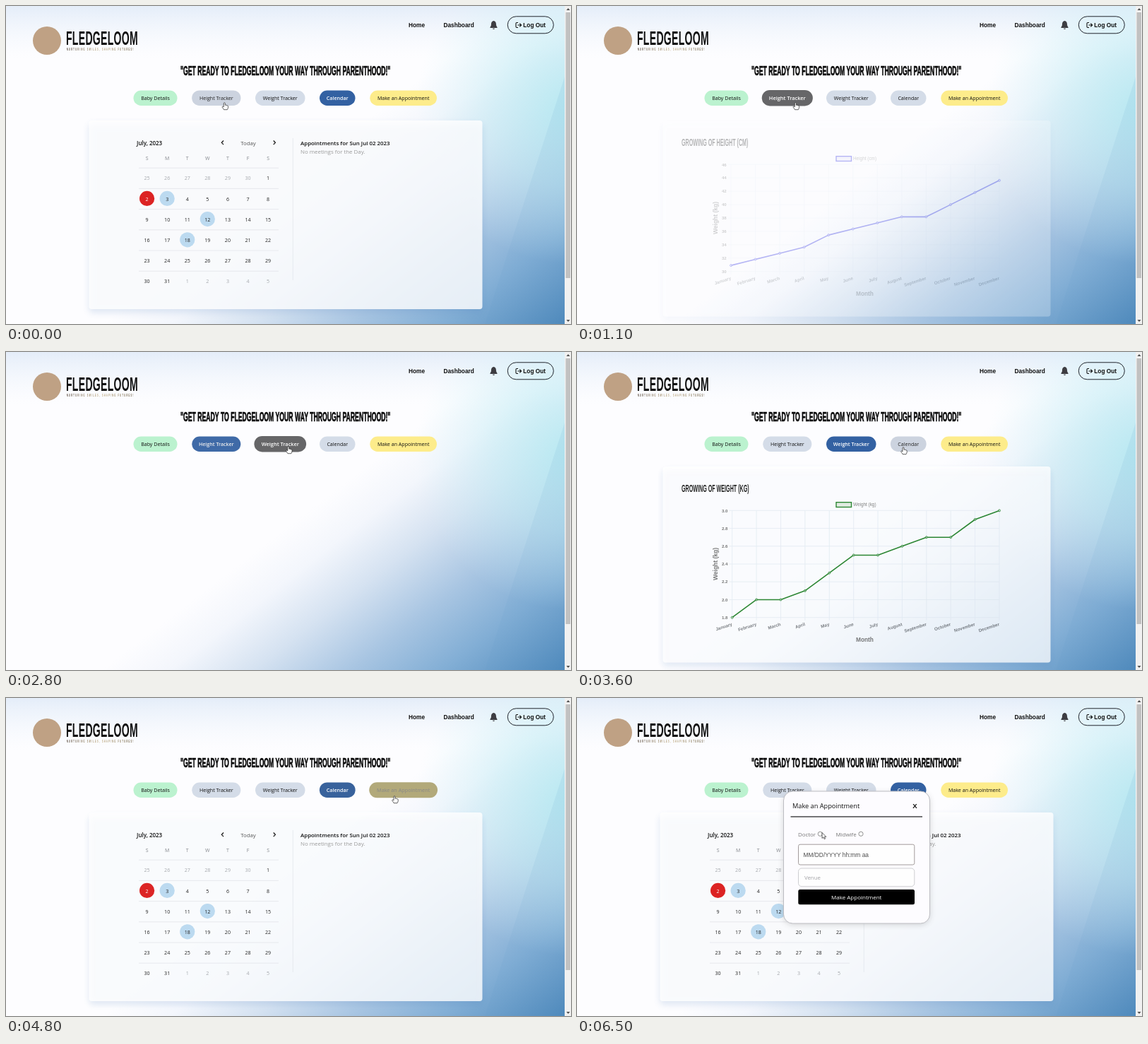
An HTML page for the animation above (6900 ms loop, 800 by 450 pixels).

```html
<!DOCTYPE html>
<html lang="en">
<head>
<meta charset="utf-8">
<title>Parenthood dashboard</title>
<style>
  html, body { margin: 0; width: 100%; height: 100%; overflow: hidden; background: #fff; }
  svg { display: block; width: 800px; height: 450px; }
  text { font-family: "Open Sans", "Noto Sans", sans-serif; }
  .arial, .display { font-family: "Liberation Sans", Arial, sans-serif; }
  .display, .bold { font-weight: 700; }
  .heavy { stroke: #0a0a0a; stroke-width: .7px; }
  .mid { text-anchor: middle; }
  .end { text-anchor: end; }
</style>
</head>
<body>
<svg id="stage" viewBox="0 0 800 450" xmlns="http://www.w3.org/2000/svg">
  <defs>
    <linearGradient id="sky" gradientUnits="userSpaceOnUse" x1="404" y1="243" x2="647" y2="559">
      <stop offset="0" stop-color="#fdfdff"/>
      <stop offset=".15" stop-color="#f3f6fc"/>
      <stop offset=".33" stop-color="#d5e2f1"/>
      <stop offset=".54" stop-color="#a8c5e2"/>
      <stop offset=".74" stop-color="#82aed5"/>
      <stop offset="1" stop-color="#508abc"/>
    </linearGradient>
    <radialGradient id="cyan" gradientUnits="userSpaceOnUse" cx="800" cy="145" r="220">
      <stop offset="0" stop-color="#b4edf3" stop-opacity=".8"/>
      <stop offset=".5" stop-color="#c6f0f6" stop-opacity=".5"/>
      <stop offset="1" stop-color="#d8f4fa" stop-opacity="0"/>
    </radialGradient>
    <linearGradient id="top" x1="0" y1="0" x2="0" y2="1">
      <stop offset="0" stop-color="#e4edf9"/>
      <stop offset="1" stop-color="#f4f8fd" stop-opacity="0"/>
    </linearGradient>
    <linearGradient id="beam" x1="0" y1="0" x2="0" y2="1">
      <stop offset="0" stop-color="#3f86bd" stop-opacity=".09"/>
      <stop offset="1" stop-color="#3f86bd" stop-opacity=".04"/>
    </linearGradient>
    <linearGradient id="gold">
      <stop offset="0" stop-color="#4a3a2c"/>
      <stop offset=".5" stop-color="#c0a878"/>
      <stop offset="1" stop-color="#5c4c2e"/>
    </linearGradient>
    <filter id="soft" x="-10%" y="-10%" width="120%" height="125%">
      <feGaussianBlur stdDeviation="5"/>
    </filter>
  </defs>
  <rect width="800" height="450" fill="url(#sky)"/>
  <rect width="800" height="75" fill="url(#top)"/>
  <rect width="800" height="450" fill="url(#cyan)"/>
  <path d="M791 100V450H678Z" fill="url(#beam)"/>
  <g id="header"></g>
  <g id="buttons"></g>
  <g id="calendar"></g>
  <g id="height"></g>
  <g id="weight"></g>
  <g id="modal"></g>
  <g id="bar">
    <path d="M791 0H800V450H791Z" fill="#f1f1f1"/>
    <path d="M792.5 9H799V385H792.5Z" fill="#c1c1c1"/>
    <path d="M793.5 6L796 3L798.5 6ZM793.5 444L796 447L798.5 444Z" fill="#505050"/>
  </g>
  <g id="cursor" stroke="#222" stroke-width=".7" stroke-linejoin="round" fill="#fff">
    <path id="hand" d="M-1 5.8V.9Q0-.5 1 .9V3.8Q2.1 3 2.6 4.1Q3.7 3.5 4.1 4.6Q5.3 4.3 5.3 5.8Q5.3 8.6 4 10.2H-.9Q-1.5 8.7-3 7Q-3.7 5.8-2.5 5.5Q-1.7 5.5-1 6.5Z"/>
    <path id="arrow" d="M0 0V8L1.9 6.4L3.2 9.2L4.6 8.6L3.3 5.9H5.8Z"/>
  </g>
</svg>
<script>
const $ = id => document.getElementById(id);
const LOOP = 6900, STEP = 100, LAST = 6500;

// Click times that switch the visible panel
const CLICK = { height: 650, weight: 2750, calendar: 3850, modal: 5700 };

const clamp = v => Math.min(1, Math.max(0, v));
const smooth = v => { v = clamp(v); return v * v * (3 - 2 * v); };
const ramp = (t, from, duration) => smooth((t - from) / duration);
const fadeIn = (t, from) => ramp(t, from, 1000) ** 1.4;
const quartOut = v => 1 - (1 - clamp(v)) ** 4;
const lerp = (a, b, k) => a + (b - a) * k;
const mix = (a, b, k) => a.map((v, i) => lerp(v, b[i], k));
const rgb = c => `rgb(${c.map(Math.round)})`;

const text = (x, y, size, str, cls = "", fill = "#111", extra = "") =>
  `<text x="${x}" y="${y}" font-size="${size}" class="${cls}" fill="${fill}" ${extra}>${str}</text>`;
const display = (x, y, size, str, cls = "", fill = "#0a0a0a", spacing = 0) =>
  text(0, 0, size, str, "display " + cls, fill,
    `transform="translate(${x} ${y}) scale(.493 1)" letter-spacing="${spacing}"`);
const rect = (x, y, w, h, r, attrs) =>
  `<rect x="${x}" y="${y}" width="${w}" height="${h}" rx="${r}" ${attrs}/>`;
const panel = (x, y, w, h) =>
  rect(x, y + 5, w, h, 5, 'fill="#4a78b8" opacity=".17" filter="url(#soft)"') +
  rect(x, y, w, h, 4, 'fill="#fff" fill-opacity=".82"');

$("header").innerHTML =
  '<circle cx="58" cy="49" r="20" fill="#bfa184"/>' +
  display(85, 55, 28.5, "FLEDGELOOM", "", "#111", .6) +
  display(86, 62.5, 5, "NURTURING SMILES, SHAPING FUTURES!", "", "url(#gold)", 2.7) +
  display(395.7, 97.7, 17.6, '"GET READY TO FLEDGELOOM YOUR WAY THROUGH PARENTHOOD!"', "mid heavy") +
  text(570, 30, 8.3, "Home", "arial bold") +
  text(619.5, 30, 8.3, "Dashboard", "arial bold") +
  text(732.3, 30, 8.3, "Log Out", "arial bold") +
  rect(710.3, 14.8, 65, 24, 12, 'fill="none" stroke="#20242c"') +
  '<path d="M725 23.5H723.2Q722 23.5 722 24.7V29.3Q722 30.5 723.2 30.5H725M724.5 27H729.3M727.3 24.6L729.7 27L727.3 29.4" fill="none" stroke="#111" stroke-width="1.1"/>' +
  '<path d="M690.5 21C687.6 21.6 687 23.8 687 26.2Q687 28.7 685.5 30V31H695.5V30Q694 28.7 694 26.2C694 23.8 693.4 21.6 690.5 21ZM689 31.7H692Q691.8 33 690.5 33T689 31.7Z" fill="#3d3d42"/>';

// Buttons
const GREY = [212, 220, 232], BLUE = [51, 97, 162], HOVER = [102, 102, 104];
const BLACK = [17, 17, 17], WHITE = [255, 255, 255];
const buttons = [
  { label: "Baby Details", x: 180.5, w: 62, base: [187, 242, 207], hover: [], active: [] },
  { label: "Height Tracker", x: 263.3, w: 69, base: GREY, hover: [[-50, 1290]], active: [[CLICK.height, CLICK.weight]] },
  { label: "Weight Tracker", x: 353, w: 70.5, base: GREY, hover: [[1550, 3230]], active: [[CLICK.weight, CLICK.calendar]] },
  { label: "Calendar", x: 444, w: 50.5, base: GREY, hover: [[3550, 4560]], active: [[-LOOP, CLICK.height], [CLICK.calendar, LOOP * 2]] },
  { label: "Make an Appointment", x: 515.3, w: 94.7, base: [253, 236, 139], hover: [[4650, 5870]], active: [] }
];
$("buttons").innerHTML = buttons.map(b =>
  `<g>${rect(-b.w / 2, -10.7, b.w, 21.4, 10.7, "")}${text(0, 2.7, 7.1, b.label, "mid", "", 'font-weight="500"')}</g>`).join("");
buttons.forEach((b, i) => b.node = $("buttons").children[i]);

const level = (t, spans) =>
  spans.reduce((sum, [on, off]) => sum + ramp(t, on, 300) - ramp(t, off, 300), 0);

function drawButton(b, t) {
  const hover = level(t, b.hover), active = level(t, b.active);
  const [pill, label] = b.node.children;
  b.node.setAttribute("transform", `translate(${b.x + b.w / 2} 130.2) scale(${1 + .045 * hover})`);
  pill.setAttribute("fill", rgb(mix(mix(b.base, BLUE, active), HOVER, hover)));
  label.setAttribute("fill", rgb(mix(BLACK, WHITE, Math.max(hover, active))));
  label.setAttribute("font-weight", Math.max(hover, active) > .5 ? 600 : 500);
}

// Calendar
function calendarMarkup() {
  const colX = c => 199.6 + 28.58 * c, rowY = r => 244 + 29.2 * r;
  let out = panel(117.5, 162, 557, 267) +
    text(185, 196.5, 8, "July, 2023", "", "#111", 'font-weight="600"') +
    text(343, 196.5, 7.8, "Today", "mid", "#555") +
    '<path d="M308 190.5L305.3 193.3L308 196.1M378.7 190.5L381.4 193.3L378.7 196.1" fill="none" stroke="#111" stroke-width="1.2"/>' +
    '<path d="M406.3 187V388" stroke="#e2e6ec" stroke-width=".8"/>' +
    text(417, 196.5, 7.9, "Appointments for Sun Jul 02 2023", "", "#111", 'font-weight="600"') +
    text(417, 209, 7.9, "No meetings for the Day.", "", "#9a9a9a");
  [..."SMTWTFS"].forEach((d, c) => out += text(colX(c), 217.5, 7, d, "mid", "#85888e"));
  for (let i = 0; i < 42; i++) {
    const c = i % 7, r = Math.floor(i / 7), x = colX(c), y = rowY(r);
    const date = i - 5, inMonth = date > 0 && date < 32;
    const day = inMonth ? date : date < 1 ? date + 30 : date - 31;
    if (!c) out += `<path d="M188 ${y - 14.8}H386" stroke="#e2e5ea" stroke-width=".8"/>`;
    const today = inMonth && day === 2;
    if (today || inMonth && [3, 12, 18].includes(day))
      out += `<circle cx="${x}" cy="${y - .8}" r="10.6" fill="${today ? "#dc2323" : "#bcdaf0"}"/>`;
    out += text(x, y + 2.3, 7.1, day, "mid", today ? "#fff" : inMonth ? "#222" : "#a5a8ad");
  }
  return out;
}
$("calendar").innerHTML = calendarMarkup();

// Charts
const MONTHS = ["January", "February", "March", "April", "May", "June", "July",
  "August", "September", "October", "November", "December"];
const charts = {
  height: { title: "GROWING OF HEIGHT (CM)", legend: "Height (cm)", left: 218, min: 30, max: 46, tick: 2, digits: 0,
    color: "#1414dc", tint: "#e0e1f8", data: [31, 32, 33, 34, 36, 37, 38, 39, 39, 41, 43, 45] },
  weight: { title: "GROWING OF WEIGHT (KG)", legend: "Weight (kg)", left: 219.7, min: 1.8, max: 3, tick: .2, digits: 1,
    color: "#1b7d22", tint: "#dfeadf", data: [1.8, 2, 2, 2.1, 2.3, 2.5, 2.5, 2.6, 2.7, 2.7, 2.9, 3] }
};
const TOP = 224.3, BASE = 375.7, RIGHT = 598;
const chartX = (c, i) => lerp(c.left, RIGHT, i / 11);
const chartY = (c, v) => lerp(BASE, TOP, (v - c.min) / (c.max - c.min));

function chartMarkup(c) {
  const grid = 'stroke="#e1e9f2" stroke-width=".8"';
  let out = panel(121.5, 162, 549, 277.5) +
    display(148, 197.5, 14.5, c.title, "", "#111") +
    rect(367, 212.7, 21.5, 6.8, 0, `fill="${c.tint}" stroke="${c.color}" stroke-width="1.4"`) +
    text(391, 218.3, 6.4, c.legend, "arial", "#777");
  for (let k = 0; k <= Math.round((c.max - c.min) / c.tick); k++) {
    const v = c.min + k * c.tick, y = chartY(c, v);
    out += `<path d="M${c.left - 4} ${y}H${RIGHT}" ${grid}/>` +
      text(c.left - 6.3, y + 2.2, 6.1, v.toFixed(c.digits), "arial bold end", "#6c6c6c");
  }
  MONTHS.forEach((m, i) => {
    const x = chartX(c, i);
    out += `<path d="M${x} ${TOP}V${BASE + 4}" ${grid}/>` +
      text(0, 0, 6.3, m, "arial bold end", "#707479", `transform="translate(${x + .5} 387) rotate(-18)"`);
  });
  return out +
    text(0, 0, 8.5, "Weight (kg)", "arial bold mid", "#6c6c6c", 'transform="translate(199 300) rotate(-90)"') +
    text(407.5, 409.5, 8.3, "Month", "arial bold mid", "#6c6c6c") +
    `<polyline fill="none" stroke="${c.color}" stroke-width="1.6" stroke-linejoin="round"/>` +
    c.data.map((v, i) => `<circle cx="${chartX(c, i)}" r="1.5" fill="${c.tint}" fill-opacity=".5" stroke="${c.color}" stroke-width=".8"/>`).join("");
}
for (const id in charts) {
  $(id).innerHTML = chartMarkup(charts[id]);
  charts[id].line = $(id).querySelector("polyline");
  charts[id].dots = $(id).querySelectorAll("circle");
}

function drawChart(id, t) {
  const c = charts[id], grow = quartOut((t - CLICK[id]) / 1000);
  const ys = c.data.map(v => lerp(BASE, chartY(c, v), grow));
  c.line.setAttribute("points", ys.map((y, i) => `${chartX(c, i)},${y}`).join(" "));
  c.dots.forEach((dot, i) => dot.setAttribute("cy", ys[i]));
}

// Appointment form
$("modal").innerHTML =
  rect(293, 135, 206, 185, 13, 'fill="#333" opacity=".22" filter="url(#soft)"') +
  rect(292.5, 132, 207, 187, 13, 'fill="#fdfcff" stroke="#bdbdc2" stroke-width="1"') +
  text(305, 156, 9.2, "Make an Appointment", "", "#111") +
  text(478.5, 156.2, 9.5, "X", "arial bold mid") +
  '<path d="M302.5 168H489" stroke="#747476" stroke-width="2"/>' +
  text(313, 195.5, 7.9, "Doctor", "", "#777") +
  text(366.5, 195.5, 7.9, "Midwife", "", "#777") +
  '<g fill="#fff" stroke="#777" stroke-width=".8"><circle cx="344.3" cy="192.3" r="3.1"/><circle cx="402" cy="192.3" r="3.1"/></g>' +
  rect(313.5, 207.2, 164.3, 28.8, 2.5, 'fill="#fefefe" stroke="#a39c9c" stroke-width="1"') +
  text(320.5, 224.6, 8.4, "MM/DD/YYYY hh:mm aa", "arial", "#4c4c4c") +
  rect(313.5, 241, 164.3, 25.7, 4.5, 'fill="#fefefe" stroke="#c9c9cc" stroke-width=".9"') +
  text(322, 257, 7.8, "Venue", "", "#a0a0a4") +
  rect(313.3, 271, 164.7, 21.2, 2.5, 'fill="#000"') +
  text(395.7, 284.6, 8, "Make Appointment", "mid", "#fff");

// Pointer: [start, end, x, y] moves from the previous stop
const START = [309.3, 136.5];
const moves = [
  [1150, 1600, 399.8, 133.5],
  [3100, 3600, 462, 134.5],
  [4400, 4800, 550, 138.5],
  [5800, 6300, 345, 197],
  [6300, 6500, 347, 190.5]
];
function pointerAt(t) {
  return moves.reduce((p, [from, to, x, y]) => mix(p, [x, y], ramp(t, from, to - from)), START);
}

const show = (id, on) => $(id).style.display = on ? "" : "none";
const panels = [
  { id: "calendar", from: -LOOP, to: CLICK.height },
  { id: "height", from: CLICK.height, to: CLICK.weight },
  { id: "weight", from: CLICK.weight, to: CLICK.calendar },
  { id: "calendar", from: CLICK.calendar, to: LOOP }
];

function render(t) {
  const now = panels.find(p => t >= p.from && t < p.to);
  for (const id of ["calendar", "height", "weight"]) show(id, id === now.id);
  $(now.id).setAttribute("opacity", fadeIn(t, now.from));
  if (charts[now.id]) drawChart(now.id, t);
  buttons.forEach(b => drawButton(b, t));
  show("modal", t >= CLICK.modal);

  const [x, y] = pointerAt(t);
  const over = y < 141 && buttons.some(b => x > b.x && x < b.x + b.w);
  $("cursor").setAttribute("transform", `translate(${x} ${y})`);
  show("hand", over);
  show("arrow", !over);
}

const start = performance.now();
function tick() {
  const t = (performance.now() - start) % LOOP;
  render(Math.min(LAST, Math.floor(t / STEP) * STEP));
  requestAnimationFrame(tick);
}
tick();
</script>
</body>
</html>
```
